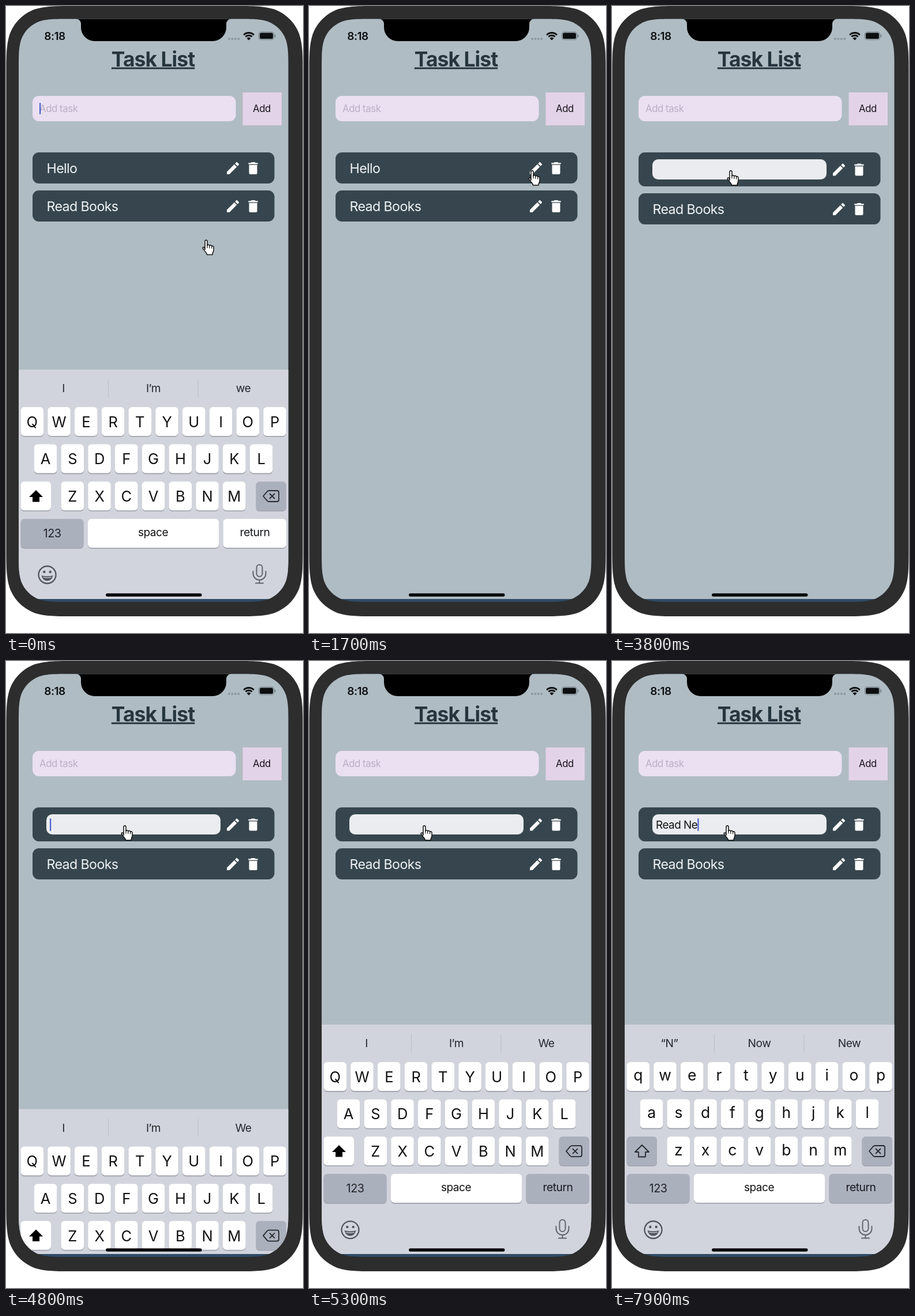
An HTML page with a canvas for the animation above (8000 ms loop, 515x1088 px).

```html
<!DOCTYPE html>
<html lang="en">
<head>
<meta charset="utf-8">
<title>Task List</title>
<style>
  html, body { margin: 0; width: 100%; height: 100%; overflow: hidden; background: #fff; }
  canvas { display: block; width: 515px; height: 1088px; }
</style>
</head>
<body>
<canvas id="stage"></canvas>
<script>
const canvas = document.getElementById('stage');
const ctx = canvas.getContext('2d');
const ratio = window.devicePixelRatio || 1;
canvas.width = 515 * ratio;
canvas.height = 1088 * ratio;

const LOOP = 8000;
const EDIT_AT = 2800;
const CLOSE_AT = 400;
const OPEN_AT = 4674;
const KEYBOARD_HEIGHT = 402;
const TYPED = 'Read Ne';
const KEY_TIMES = [5800, 6100, 6300, 6500, 6900, 7300, 7800];
const WORDS = [
  ['I', 'I’m', 'We'],
  ['“R”', 'Right', 'Really'],
  ['“Re”', 'Read', 'Really'],
  ['“Rea”', 'Read', 'Really'],
  ['“Read”', 'Reading', 'Ready'],
  ['the', 'it', 'this'],
  ['“N”', 'Now', 'New'],
  ['“N”', 'Now', 'New']
];
// Pointer stops: time, x, y
const POINTER = [
  [100, 340, 404.5], [400, 380, 294.5],
  [1000, 380, 294.5], [1200, 380, 284],
  [2900, 380, 284], [3400, 199, 284],
  [5000, 199, 284], [5200, 193, 284]
];

const PENCIL = new Path2D('M3 17.25V21h3.75L17.81 9.94l-3.75-3.75L3 17.25zM20.71 7.04c.39-.39.39-1.02 0-1.41l-2.34-2.34c-.39-.39-1.02-.39-1.41 0l-1.83 1.83 3.75 3.75 1.83-1.83z');
const TRASH = new Path2D('M6 19c0 1.1.9 2 2 2h8c1.1 0 2-.9 2-2V7H6v12zM19 4h-3.5l-1-1h-5l-1 1H5v2h14V4z');
const HAND = new Path2D('M5 18V4C5 1 9 1 9 4V11C9.5 9 12.6 9.3 12.8 11.5C13.5 9.8 16.4 10.3 16.6 12.5C17.5 11.2 20 11.8 20 14V19C20 22 18 23 18 27H8.5C8.5 24 6 23 4 19.5L1.5 16.5C.3 14.3 3 13 4.2 15Z');
const KNUCKLES = new Path2D('M9 10V15M12.8 11.5V15.5M16.6 12.5V16');
const NOTCH = new Path2D('M121 22A9 9 0 0 1 130 31V37A24 24 0 0 0 154 61H358A24 24 0 0 0 382 37V31A9 9 0 0 1 391 22Z');
const SHIFT = new Path2D('M52 840L64 852H58V860.5H46V852H40Z');
const ERASE = new Path2D('M446 850.5L453 842.3Q454 841 456 841H470Q473 841 473 844V857Q473 860 470 860H456Q454 860 453 858.7ZM457.5 846.5L465.5 854.5M465.5 846.5L457.5 854.5');
const MIC = new Path2D('M434.5 974.5A5 5 0 0 1 444.5 974.5V985A5 5 0 0 1 434.5 985ZM428.5 981V985A11 11 0 0 0 450.5 985V981M439.5 996V1001.5M433 1001.5H446');
const BODY = squircle(0.5, 0, 514, 1059, 78);
const SCREEN = squircle(22, 22.5, 467.5, 1011.5, 57);

const clamp = v => Math.min(1, Math.max(0, v));
const smooth = v => v * v * (3 - 2 * v);

function spring(ms) {
  const x = Math.max(0, ms) * 0.017;
  return 1 - (1 + x) * Math.exp(-x);
}

// Rectangle whose corners ease gradually into the straight sides
function squircle(x, y, w, h, r) {
  const path = new Path2D();
  const cx = x + w / 2, cy = y + h / 2;
  const curve = [[1.529, 0], [1.088, 0], [0.868, 0], [0.631, 0.075], [0.373, 0.169]];
  const corner = [...curve, ...curve.map(([a, b]) => [b, a]).reverse()];
  for (const [sx, sy, back] of [[-1, -1, true], [1, -1], [1, 1, true], [-1, 1]]) {
    const pts = corner.map(([a, b]) => [cx + sx * (w / 2 - a * r), cy + sy * (h / 2 - b * r)]);
    if (back) pts.reverse();
    path.lineTo(...pts[0]);
    for (let i = 1; i < pts.length; i += 3) {
      path.bezierCurveTo(...pts[i], ...pts[i + 1], ...pts[i + 2]);
    }
  }
  path.closePath();
  return path;
}

function box(x, y, w, h, r, color) {
  ctx.fillStyle = color;
  ctx.beginPath();
  ctx.roundRect(x, y, w, h, r);
  ctx.fill();
}

function dot(x, y, r, color) {
  ctx.fillStyle = color;
  ctx.beginPath();
  ctx.arc(x, y, r, 0, Math.PI * 2);
  ctx.fill();
}

function line(path, color, width) {
  ctx.strokeStyle = color;
  ctx.lineWidth = width;
  ctx.lineJoin = ctx.lineCap = 'round';
  ctx.stroke(path);
}

function text(str, x, y, size, color, align = 'left', weight = 400) {
  ctx.font = `${weight} ${size}px Inter, "Liberation Sans", sans-serif`;
  ctx.letterSpacing = `${-size * 0.026}px`;
  ctx.textAlign = align;
  ctx.fillStyle = color;
  ctx.fillText(str, x, y);
  return ctx.measureText(str).width;
}

function icon(path, x, y) {
  ctx.save();
  ctx.translate(x, y);
  ctx.scale(1.167, 1.167);
  ctx.translate(-12, -12);
  ctx.fillStyle = '#fff';
  ctx.fill(path);
  ctx.restore();
}

function drawStatus() {
  ctx.fillStyle = '#000';
  ctx.fill(NOTCH);
  text('8:18', 84.5, 59, 19, '#0c0f11', 'center', 600);
  for (let i = 0; i < 4; i++) dot(387 + i * 5.4, 57, 2, '#8d999f');

  ctx.strokeStyle = '#0c0f11';
  ctx.lineCap = 'butt';
  ctx.lineWidth = 2.8;
  for (const r of [12.5, 8]) {
    ctx.beginPath();
    ctx.arc(421, 59, r, -Math.PI * 0.75, -Math.PI * 0.25);
    ctx.stroke();
  }
  ctx.fillStyle = '#0c0f11';
  ctx.beginPath();
  ctx.moveTo(421, 59.5);
  ctx.arc(421, 59.5, 5, -Math.PI * 0.75, -Math.PI * 0.25);
  ctx.fill();

  const shell = new Path2D();
  shell.roundRect(438.5, 45, 26, 13.5, 4);
  line(shell, '#737e84', 1.2);
  box(440, 46.5, 23, 10.5, 2.5, '#0c0f11');
  box(465.8, 49.5, 1.6, 5, 1, '#737e84');
}

function drawCard(label, y, height, iconY, editing) {
  box(46, y, 419.5, height, 11, '#37464e');
  if (editing) box(70, y + 12, 302, 35, 10, '#ebecef');
  else text(label, 70.5, y + 36, 23.2, '#f0f3f5');
  icon(PENCIL, 393.5, iconY);
  icon(TRASH, 428.5, iconY);
}

function drawCaret(x, y, height) {
  box(x, y, 2.2, height, 1, '#4a5fd0');
}

function drawTasks(t, typed) {
  const editing = t >= EDIT_AT;
  const shift = editing ? 5 : 0;

  const width = text('Task List', 255, 105, 35.4, '#26353e', 'center', 700);
  box(255 - width / 2, 106.5, width, 3, 0, '#26353e');
  box(46, 156, 352.5, 44, 11, '#eae0f2');
  text('Add task', 58, 184, 16.8, '#b9b0c3');
  if (t < 300) drawCaret(58, 168, 20);
  box(410.5, 150, 67.5, 57, 0, '#e3d3e8');
  text('Add', 443.5, 184, 16.8, '#17151a', 'center');

  drawCard('Hello', 254, 54 + shift, editing ? 284 : 281.5, editing);
  drawCard('Read Books', 320 + shift, 54, 347.5 + shift, false);

  if (t >= OPEN_AT) {
    const end = 76 + text(TYPED.slice(0, typed), 76, 290.5, 18.9, '#111');
    const since = t - (typed ? KEY_TIMES[typed - 1] : OPEN_AT);
    if (since % 1000 < 500) drawCaret(end, 273, 22);
  }
}

function key(x, y, w, gray) {
  box(x, y + 1.8, w, 50, 6, '#a3a6b0');
  box(x, y, w, 50, 6, gray ? '#abb0bd' : '#fff');
}

function drawKeyboard(t, typed, offset) {
  const second = t >= OPEN_AT;
  const lower = typed > 0;
  const closing = !second && t > CLOSE_AT;
  const words = second ? WORDS[typed] : ['I', 'I’m', 'we'];

  ctx.save();
  ctx.translate(0, offset);
  box(22, 631, 468, KEYBOARD_HEIGHT, 0, '#d2d4dd');

  // Suggestions are wiped away while the keyboard leaves
  ctx.save();
  if (closing) {
    ctx.beginPath();
    ctx.rect(235, 640, 16, 50);
    ctx.rect(390, 640, 22, 50);
    ctx.clip();
  }
  words.forEach((word, i) => {
    ctx.globalAlpha = closing && i === 2 ? 0.3 : 1;
    text(word, 99.5 + i * 156, 670, 19.2, '#23262b', 'center');
  });
  ctx.restore();
  box(177, 648, 1, 31, 0, '#bbbec8');
  box(332.5, 648, 1, 31, 0, '#bbbec8');

  ['QWERTYUIOP', 'ASDFGHJKL', 'ZXCVBNM'].forEach((row, r) => {
    const left = [25.5, 48.8, 95.5][r];
    const top = 696 + r * 64.6;
    [...row].forEach((letter, i) => {
      const x = left + i * 46.75;
      key(x, top, 39.5);
      text(lower ? letter.toLowerCase() : letter, x + 19.5,
        top + (lower ? 32.3 : 34.7), lower ? 26.5 : 25.5, '#111', 'center');
    });
  });

  key(25.5, 825.2, 52.5, lower);
  key(433.5, 825.2, 52.5, true);
  if (lower) line(SHIFT, '#25282d', 1.8);
  else { ctx.fillStyle = '#000'; ctx.fill(SHIFT); }
  line(ERASE, '#25282d', 1.8);

  key(25.5, 890, 109, true);
  key(142, 890, 227, false);
  key(376.5, 890, 109.5, second);
  text('123', 80, 921.5, 19.8, '#202328', 'center');
  text('space', 255, 920, 19, '#111', 'center');
  text('return', 431.5, 920, 19.4, '#17191d', 'center');

  const face = new Path2D();
  face.arc(71.5, 987, 15, 0, Math.PI * 2);
  line(face, '#50555e', 2.3);
  dot(66.3, 982, 2.2, '#50555e');
  dot(76.7, 982, 2.2, '#50555e');
  ctx.fill(new Path2D('M61.5 988Q71.5 991 81.5 988Q79.5 997.5 71.5 997.5Q63.5 997.5 61.5 988Z'));
  line(new Path2D('M65 991.2Q71.5 993 78 991.2'), '#d2d4dd', 1.4);
  line(MIC, '#60656e', 2);
  ctx.restore();
}

function drawPointer(t) {
  let [, x, y] = POINTER[0];
  for (let i = 1; i < POINTER.length; i++) {
    const [t0, x0, y0] = POINTER[i - 1];
    const [t1, x1, y1] = POINTER[i];
    if (t < t0) break;
    const p = smooth(clamp((t - t0) / (t1 - t0)));
    x = x0 + (x1 - x0) * p;
    y = y0 + (y1 - y0) * p;
  }
  ctx.save();
  ctx.translate(x, y);
  ctx.fillStyle = '#fff';
  ctx.fill(HAND);
  line(HAND, '#111', 1.5);
  line(KNUCKLES, '#111', 1.2);
  ctx.restore();
}

function draw(t) {
  const typed = KEY_TIMES.filter(k => t >= k).length;
  const hidden = t < OPEN_AT ? spring(t - CLOSE_AT) : 1 - spring(t - OPEN_AT);

  ctx.setTransform(ratio, 0, 0, ratio, 0, 0);
  box(0, 0, 515, 1088, 0, '#fff');
  ctx.fillStyle = '#2d2d2d';
  ctx.fill(BODY);

  ctx.save();
  ctx.clip(SCREEN);
  box(22, 22, 468, 1012, 0, '#2f4c68');
  ctx.beginPath();
  ctx.rect(22, 22, 468, 1007);
  ctx.clip();
  box(22, 22, 468, 1007, 0, '#b0bcc3');
  drawTasks(t, typed);
  if (hidden < 0.995) drawKeyboard(t, typed, KEYBOARD_HEIGHT * hidden);
  box(173, 1019.2, 166.5, 5.6, 2.8, '#08090b');
  drawStatus();
  ctx.restore();

  drawPointer(t);
}

const start = performance.now();
function tick() {
  draw((performance.now() - start) % LOOP);
  requestAnimationFrame(tick);
}
tick();
</script>
</body>
</html>
```
